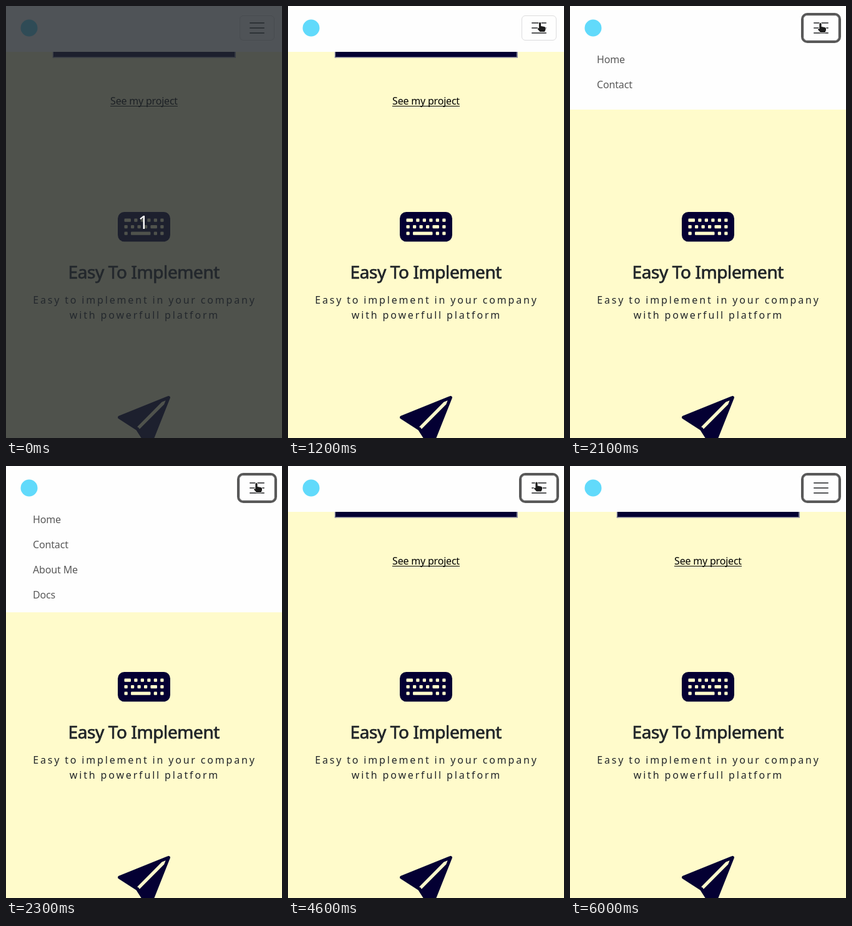
Animation of 442 by 688 pixels, one loop 6400 ms. Source, as an HTML page:

```html
<!DOCTYPE html>
<html lang="en">
<head>
<meta charset="utf-8">
<title>Collapsing menu</title>
<style>
  html, body { margin: 0; width: 100%; height: 100%; overflow: hidden; background: #fffbcb; }
  svg { display: block; width: 100vw; height: 100vh; }
  text { font: 16px "Noto Sans", "Open Sans", sans-serif; fill: #212529; }
  .mid { text-anchor: middle; }
  .link { fill: #000; letter-spacing: -.2px; }
  .title { font-size: 28px; font-weight: 500; letter-spacing: -.4px; stroke: #212529; stroke-width: .75px; }
  .lead { letter-spacing: 2.83px; word-spacing: -1px; }
  .menu text { fill: #595959; letter-spacing: -.15px; }
  .count { font-size: 29px; fill: #fff; }
  .navy { fill: #040033; }
  .cursor { fill: #1c1c1c; stroke: #fff; stroke-width: 1.6px; stroke-linejoin: round; paint-order: stroke; }
</style>
</head>
<body>
<svg viewBox="0 0 442 688" preserveAspectRatio="none">
  <defs>
    <clipPath id="menuClip"><rect id="menuBox" width="442" height="65"/></clipPath>
  </defs>

  <rect width="442" height="688" fill="#fffbcb"/>

  <!-- page content -->
  <path d="M74.5 60H78V82.5H74.5Z" fill="#a9a8b4"/>
  <path d="M75 80H366V60H368V82.5H75Z" fill="#85859a"/>
  <path class="navy" d="M76 60H366V81H76Z"/>
  <text class="mid link" x="221" y="157">See my project</text>
  <path d="M167 159.5H275" stroke="#000"/>
  <g transform="translate(179 307) scale(5.25)">
    <rect class="navy" y="4" width="16" height="9" rx="2"/>
    <g id="keys" fill="#fffbcb"></g>
  </g>
  <text class="mid title" x="220.8" y="434">Easy To Implement</text>
  <text class="mid lead" x="222" y="474">Easy to implement in your company</text>
  <text class="mid lead" x="222" y="498">with powerfull platform</text>
  <path class="navy" fill-rule="evenodd" transform="translate(179 621) scale(5.25)"
    d="M15.96.69A.5.5 0 0 0 15.31.04L.31 6.04A.5.5 0 0 0 .23 6.92L5.64 10.36 9.08 15.77A.5.5 0 0 0 9.96 15.69ZM14.13 2.58 6.64 10.07 6.42 9.73A.5.5 0 0 0 6.27 9.58L5.93 9.36 13.42 1.87 14.6 1.4Z"/>

  <!-- navigation -->
  <rect id="nav" width="442" height="73" fill="#fefefe"/>
  <circle cx="37" cy="35" r="13.5" fill="#61dafb"/>
  <g class="menu" clip-path="url(#menuClip)">
    <text x="43" y="91">Home</text>
    <text x="43" y="131">Contact</text>
    <text x="43" y="171">About Me</text>
    <text x="43" y="211">Docs</text>
  </g>
  <rect id="ring" fill="none" stroke="#595959"/>
  <rect x="374.5" y="15.5" width="55" height="39" rx="5.5" fill="none" stroke="#dcdcdd"/>
  <path d="M391 27H413M391 35H413M391 43H413" stroke="#57585a" stroke-width="2" stroke-linecap="round"/>

  <path id="hand" class="cursor" d="M-1.6 1.5A1.6 1.6 0 0 1 1.6 1.5V6L7 7Q9 7.3 9 9V11.5L7.5 15H0L-4 10.5Q-3.8 8.5-1.6 9.5Z"/>
  <path id="arrow" class="cursor" d="M0 0V16L3.8 12.6 6.3 18.2 8.8 17.1 6.3 11.6H11.4Z"/>

  <g id="cover">
    <rect width="442" height="688" fill="rgb(36,41,46)" fill-opacity=".8"/>
    <text class="mid count" x="220" y="355">1</text>
  </g>
</svg>
<script>
const LOOP = 6400, STEP = 100;
const NAV_CLOSED = 73, NAV_OPEN = 233, NAV_PAD = 8;
const $ = id => document.getElementById(id);
const clamp = v => Math.min(1, Math.max(0, v));

const setAttrs = (el, attrs) => {
  for (const name in attrs) el.setAttribute(name, attrs[name]);
};
const show = (el, on) => el.setAttribute("visibility", on ? "visible" : "hidden");

// key rows: y, then [x, width] pairs on a 16-unit grid
const keyRows = [
  [6, [[2, 2], [5, 1], [7, 1], [9, 1], [11, 1], [13, 1]]],
  [8, [[2, 1], [4, 1], [6, 1], [8, 1], [10, 2], [13, 1]]],
  [10, [[2, 1], [4, 6], [11, 1], [13, 1]]]
];
for (const [y, row] of keyRows) {
  for (const [x, width] of row) {
    const key = document.createElementNS("http://www.w3.org/2000/svg", "rect");
    setAttrs(key, { x, y, width, height: 1, rx: .25 });
    $("keys").append(key);
  }
}

// CSS "ease": cubic-bezier(.25, .1, .25, 1)
function ease(x) {
  if (x <= 0 || x >= 1) return clamp(x);
  const bez = (a, b, s) => 3 * a * s * (1 - s) ** 2 + 3 * b * s * s * (1 - s) + s ** 3;
  let lo = 0, hi = 1;
  for (let i = 0; i < 24; i++) {
    const mid = (lo + hi) / 2;
    if (bez(.25, .25, mid) < x) lo = mid; else hi = mid;
  }
  return bez(.1, 1, lo);
}

// pointer path: time, x, y
const path = [
  [1100, 408, 24], [1300, 399, 28], [1500, 401, 27], [4500, 401, 27],
  [4600, 398, 25.5], [4800, 358, 14], [4900, 358, 14], [5000, 340, 13],
  [5200, 230, 44], [5300, 170, 50], [5500, 70, 32], [5600, 49, 22],
  [5700, 50, 12], [5900, 52, -10]
];

function pointerAt(t) {
  const next = path.findIndex(p => p[0] > t);
  if (next < 0) return path[path.length - 1].slice(1);
  if (next === 0) return path[0].slice(1);
  const [t0, x0, y0] = path[next - 1], [t1, x1, y1] = path[next];
  const k = (t - t0) / (t1 - t0);
  return [x0 + (x1 - x0) * k, y0 + (y1 - y0) * k];
}

function draw(t) {
  show($("cover"), t < 100);

  const opened = ease(clamp((t - 2000) / 300)) - ease(clamp((t - 3909) / 350));
  const navHeight = Math.round(NAV_CLOSED + (NAV_OPEN - NAV_CLOSED) * opened);
  $("nav").setAttribute("height", navHeight);
  $("menuBox").setAttribute("height", navHeight - NAV_PAD);

  const w = 4 * clamp((t - 1850) / 100);
  show($("ring"), t >= 1900);
  setAttrs($("ring"), {
    x: 374 - w / 2, y: 15 - w / 2, width: 56 + w, height: 40 + w,
    rx: 6 + w / 2, "stroke-width": w
  });

  const [x, y] = pointerAt(t);
  const visible = t >= 1100 && t < 6000, overButton = x >= 374;
  show($("hand"), visible && overButton);
  show($("arrow"), visible && !overButton);
  for (const id of ["hand", "arrow"]) $(id).setAttribute("transform", `translate(${x} ${y})`);
}

const start = performance.now();
function tick() {
  const t = (performance.now() - start) % LOOP;
  draw(Math.floor(t / STEP) * STEP);
  requestAnimationFrame(tick);
}
draw(0);
requestAnimationFrame(tick);
</script>
</body>
</html>
```
